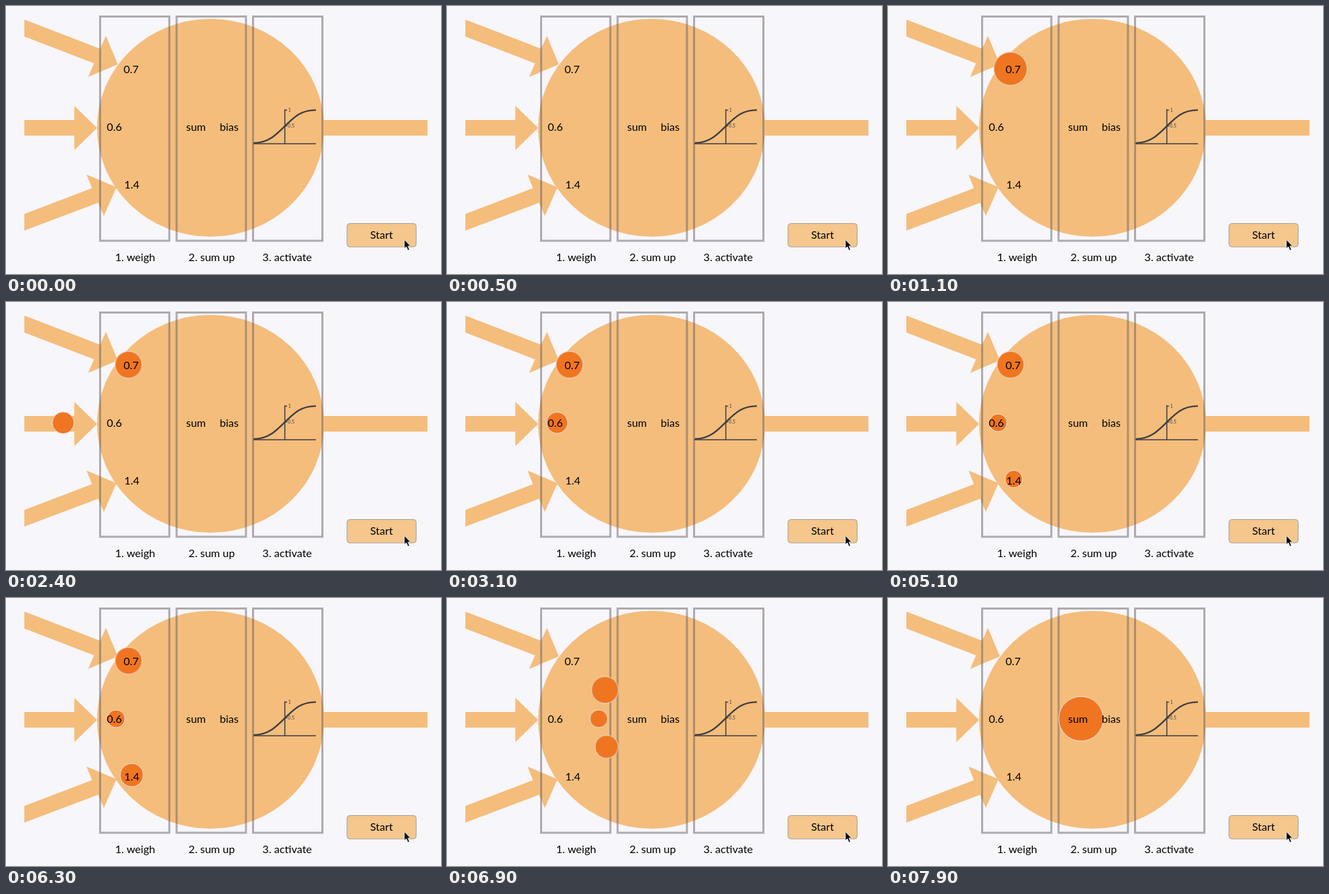
Write an HTML page that moves like this. It is 640 by 395 pixels and loops after 8000 ms.

```html
<!DOCTYPE html>
<html lang="en">
<head>
<meta charset="utf-8">
<title>Neuron: weigh, sum up, activate</title>
<style>
html, body { margin: 0; width: 100%; height: 100%; overflow: hidden; background: #f7f6fa; }
svg { display: block; width: 100vw; height: 100vh; }
text { font: 16px Lato, Carlito, sans-serif; fill: #000; }
.mid { text-anchor: middle; }
.tick { font-size: 7px; fill: #444; }
.body { fill: #f4bd7c; }
.stage { fill: none; stroke: rgba(102, 96, 100, .5); stroke-width: 3; }
.plot { fill: none; stroke: #3f3e42; stroke-width: 1.5; }
.ball {
  fill: #f07520; stroke: #e9dfd8; stroke-width: 1;
  transform: translate(-80px, 0);
  animation: 8s ease-in-out infinite;
}

/* Each ball rolls in, is resized by its weight, then joins the sum. */
#b1 { r: 24.5px; animation-name: first; }
#b2 { r: 16px; animation-name: second; }
#b3 { r: 12.8px; animation-name: third; }
#total { animation-name: total; }

@keyframes first {
  0% { transform: translate(-80px, 0); animation-timing-function: step-end; }
  6.3% { transform: translate(27px, 33px); }
  13.8% { transform: translate(180.2px, 92.5px); }
  16% { r: 24.5px; }
  23.5% { r: 19.8px; }
  82.4% { transform: translate(180.2px, 92.5px); }
  90.1%, 100% { transform: translate(284px, 178px); r: 19.8px; }
}
@keyframes second {
  0% { transform: translate(-80px, 0); animation-timing-function: step-end; }
  26.6% { transform: translate(27px, 178px); }
  34.1% { transform: translate(162px, 178px); }
  37% { r: 16px; }
  44.5% { r: 13px; }
  82.4% { transform: translate(162px, 178px); }
  90.1%, 100% { transform: translate(284px, 178px); r: 13px; }
}
@keyframes third {
  0% { transform: translate(-80px, 0); animation-timing-function: step-end; }
  51.8% { transform: translate(27px, 319px); }
  59.3% { transform: translate(185px, 261px); }
  65% { r: 12.8px; }
  72% { r: 17px; }
  82.4% { transform: translate(185px, 261px); }
  90.1%, 100% { transform: translate(284px, 178px); r: 17px; }
}
@keyframes total {
  0% { transform: translate(-80px, 0); r: 19.8px; animation-timing-function: step-end; }
  90.1% { transform: translate(284px, 178px); r: 19.8px; }
  95%, 100% { transform: translate(284px, 178px); r: 32.8px; }
}
</style>
</head>
<body>
<svg viewBox="0 0 640 395" preserveAspectRatio="none">
  <clipPath id="inside"><rect x="26" width="614" height="395"/></clipPath>

  <g class="body">
    <ellipse cx="301" cy="179.5" rx="167" ry="160.5"/>
    <path d="M27 20L138.5 63L147 44L164.5 86L121 104.5L129.5 84.5L27 45Z"/>
    <path d="M27 168H100.5V147L134 179.7L100.5 212.5V191H27Z"/>
    <path d="M27 306.5L126.5 268.5L118.5 248.5L162.5 267L144 309.5L135.5 290L27 331Z"/>
    <rect x="466" y="168" width="154" height="23"/>
  </g>

  <g class="stage">
    <rect x="138.5" y="15.5" width="101.8" height="330.5"/>
    <rect x="251" y="15.5" width="102" height="330.5"/>
    <rect x="363.5" y="15.5" width="102" height="330.5"/>
  </g>

  <g class="plot">
    <path d="M364 203H456M410.3 152V203M410 153.5H413.5M410 177H413.5"/>
    <path stroke-width="2.3" style="stroke-width:2.3" d="M364.5 201.8C386 202 397 190 410.3 177S434 153 456 153.3"/>
  </g>
  <text class="tick" x="415" y="155.5">1</text>
  <text class="tick" x="414.5" y="179.3">0.5</text>

  <g clip-path="url(#inside)">
    <circle class="ball" id="b1"/>
    <circle class="ball" id="b2"/>
    <circle class="ball" id="b3"/>
    <circle class="ball" id="total"/>
  </g>

  <text x="173" y="99">0.7</text>
  <text x="148.2" y="184">0.6</text>
  <text x="174" y="269">1.4</text>
  <text class="mid" x="279.5" y="184">sum</text>
  <text class="mid" x="328.3" y="184">bias</text>
  <text class="mid" x="190" y="376">1. weigh</text>
  <text class="mid" x="302.7" y="376">2. sum up</text>
  <text class="mid" x="413.7" y="376">3. activate</text>

  <rect x="501.8" y="320.6" width="101.6" height="34.4" rx="4" fill="#f5c78d" stroke="#a79c94"/>
  <text class="mid" x="552.5" y="343">Start</text>
  <path d="M586 344.3V357.6L589 354.8L591.3 360.2L593.7 359.2L591.4 353.9H595.4Z" fill="#000" stroke="#fff" stroke-width=".9"/>
</svg>
</body>
</html>
```
